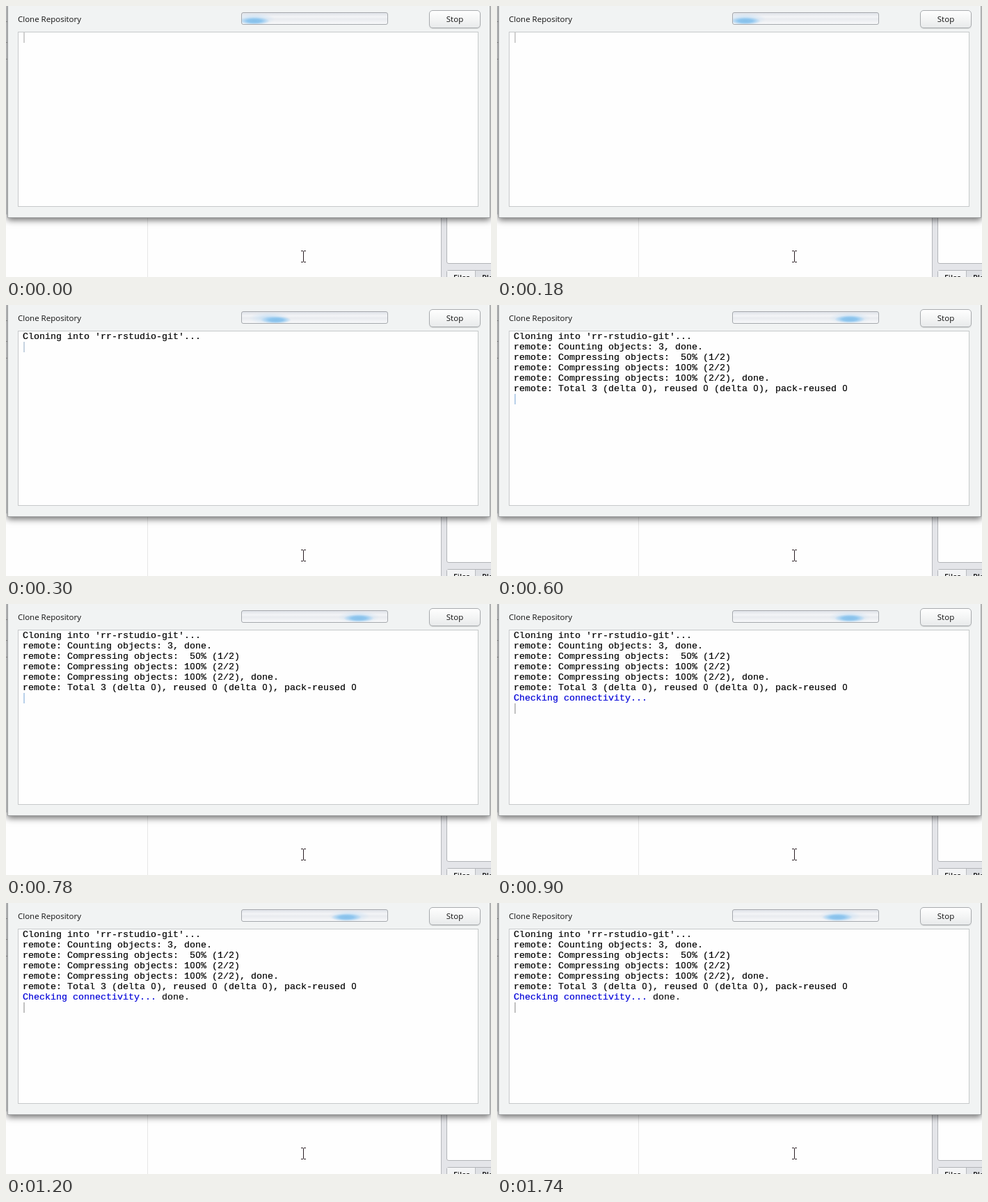
These frames come from a looping animation (697 by 390 pixels, 2100 ms). An HTML page:

```html
<!DOCTYPE html>
<html lang="en">
<head>
<meta charset="utf-8">
<title>Clone Repository</title>
<style>
  html, body { margin: 0; width: 100%; height: 100%; overflow: hidden; }
  body { position: relative; background: #fefefe; font: 11.5px/16px "Open Sans", "Noto Sans", sans-serif; color: #111; }
  div, pre, svg { position: absolute; box-sizing: border-box; margin: 0; }

  /* window behind the dialog */
  .divider { left: 203px; top: 0; width: 1px; height: 390px; background: #e6e6e6; }
  .gutter { left: 625px; top: 0; width: 72px; height: 390px; background: #e4e5e9; border-left: 1px solid #b4b6ba; }
  .pane { left: 633px; top: -10px; width: 80px; height: 381px; background: #fefefe; border: 1px solid #b2b4b8; border-radius: 3px; }
  .tabs { left: 633px; top: 380px; width: 80px; height: 30px; background: #dfe1e5; border: 1px solid #b2b4b8; border-radius: 3px 0 0; font-weight: 600; font-size: 11px; }
  .tab { left: 0; top: 0; width: 41px; height: 30px; background: #f3f4f5; border-right: 1px solid #b9bbbf; }
  .tabs span { position: absolute; top: 2px; }
  .edge { left: 0; top: 0; width: 3px; height: 300px; background: #e3e5e7; }
  .edge i { position: absolute; left: 0; width: 3px; height: 1px; background: #aaa; }

  /* dialog */
  .dialog { left: 2px; top: -10px; width: 694px; height: 315px; background: #f1f3f3; border: 1px solid #a2a4a5; box-shadow: 0 3px 9px rgba(0, 0, 0, .58); }
  .title { left: 17px; top: 11px; white-space: nowrap; }
  .stop { left: 608px; top: 6px; width: 74px; height: 26px; line-height: 24px; text-align: center; border: 1px solid #a8abae; border-radius: 5px; background: linear-gradient(#fefefe, #f4f5f5 50%, #e8eaeb); box-shadow: 0 1px 1px rgba(0, 0, 0, .12); }
  .bar {
    left: 338px; top: 9px; width: 211px; height: 18px;
    border: 1px solid #a5a8ad; border-radius: 3px;
    background:
      radial-gradient(closest-side, #86c0ea 0, #8fc6ee 45%, rgba(150, 202, 240, .55) 70%, rgba(170, 212, 243, 0)) no-repeat,
      radial-gradient(closest-side, rgba(170, 212, 245, .75), rgba(190, 220, 245, .35) 60%, rgba(200, 225, 245, 0)) no-repeat,
      linear-gradient(#dfe2e8, #f3f4f7 35%, #e9ebef 55%, #f7f8fa);
    background-size: 44px 11px, 60px 18px, 100% 100%;
    animation: slide 2.1s step-end infinite;
  }
  .box { left: 17px; top: 37px; width: 662px; height: 252px; background: #fefefe; border: 1px solid #c6c9ca; }

  /* console output */
  .log { left: 24px; top: 38px; }
  .log pre { position: static; overflow: hidden; font: 13.333px/15px "Liberation Mono", monospace; color: #000; -webkit-text-stroke: .2px; animation: grow 2.1s step-end infinite; }
  .log b { display: inline-block; width: 8px; height: 15px; vertical-align: top; text-align: center; font: 12.5px/15px "Liberation Sans", sans-serif; }
  .check { color: #0000d8; }
  .done { color: #111; animation: appear 2.1s step-end infinite; }
  .caret { position: static; margin-left: 1px; width: 2px; height: 15px; animation: tint 2.1s step-end infinite; }

  @keyframes slide {
    0% { background-position: -4px 6px, -12px 0, 0 0; }
    14.2857% { background-position: 27px 6px, 10px 0, 0 0; }
    28.5714% { background-position: 146px 5px, 138px 0, 0 0; }
    57.1428%, 100% { background-position: 128px 5px, 124px 0, 0 0; }
  }
  @keyframes grow {
    0% { height: 0; }
    14.2857% { height: 15px; }
    28.5714% { height: 90px; }
    42.8571%, 100% { height: 105px; }
  }
  @keyframes tint {
    0% { background: #cfcfcf; }
    14.2857% { background: #c6d3e0; }
    28.5714% { background: #b9d0ea; }
    42.8571%, 100% { background: #c2c2c2; }
  }
  @keyframes appear {
    0% { visibility: hidden; }
    57.1428%, 100% { visibility: visible; }
  }
</style>
</head>
<body>
  <div class="divider"></div>
  <div class="gutter"></div>
  <div class="pane"></div>
  <div class="tabs">
    <div class="tab"></div>
    <span style="left:9px">Files</span><span style="left:50px">Plots</span>
  </div>
  <div class="edge"><i style="top:22px"></i><i style="top:52px"></i><i style="top:76px"></i></div>

  <div class="dialog"></div>
  <div class="title">Clone Repository</div>
  <div class="bar"></div>
  <div class="stop">Stop</div>
  <div class="box"></div>
  <div class="log">
    <pre>Cloning into 'rr-rstudio-git'...
remote: Counting objects: 3, done.
remote: Compressing objects:  5<b>0</b>% (1/2)
remote: Compressing objects: 1<b>0</b><b>0</b>% (2/2)
remote: Compressing objects: 1<b>0</b><b>0</b>% (2/2), done.
remote: Total 3 (delta <b>0</b>), reused <b>0</b> (delta <b>0</b>), pack-reused <b>0</b>
<span class="check">Checking connectivity...</span><span class="done"> done.</span></pre>
    <div class="caret"></div>
  </div>

  <svg style="left:423px;top:352px" width="9" height="17" fill="none" stroke="#2c2026" shape-rendering="crispEdges">
    <path d="M1 .5H4M5 .5H8M4.5 1V16M1 16.5H4M5 16.5H8"/>
  </svg>
</body>
</html>
```
